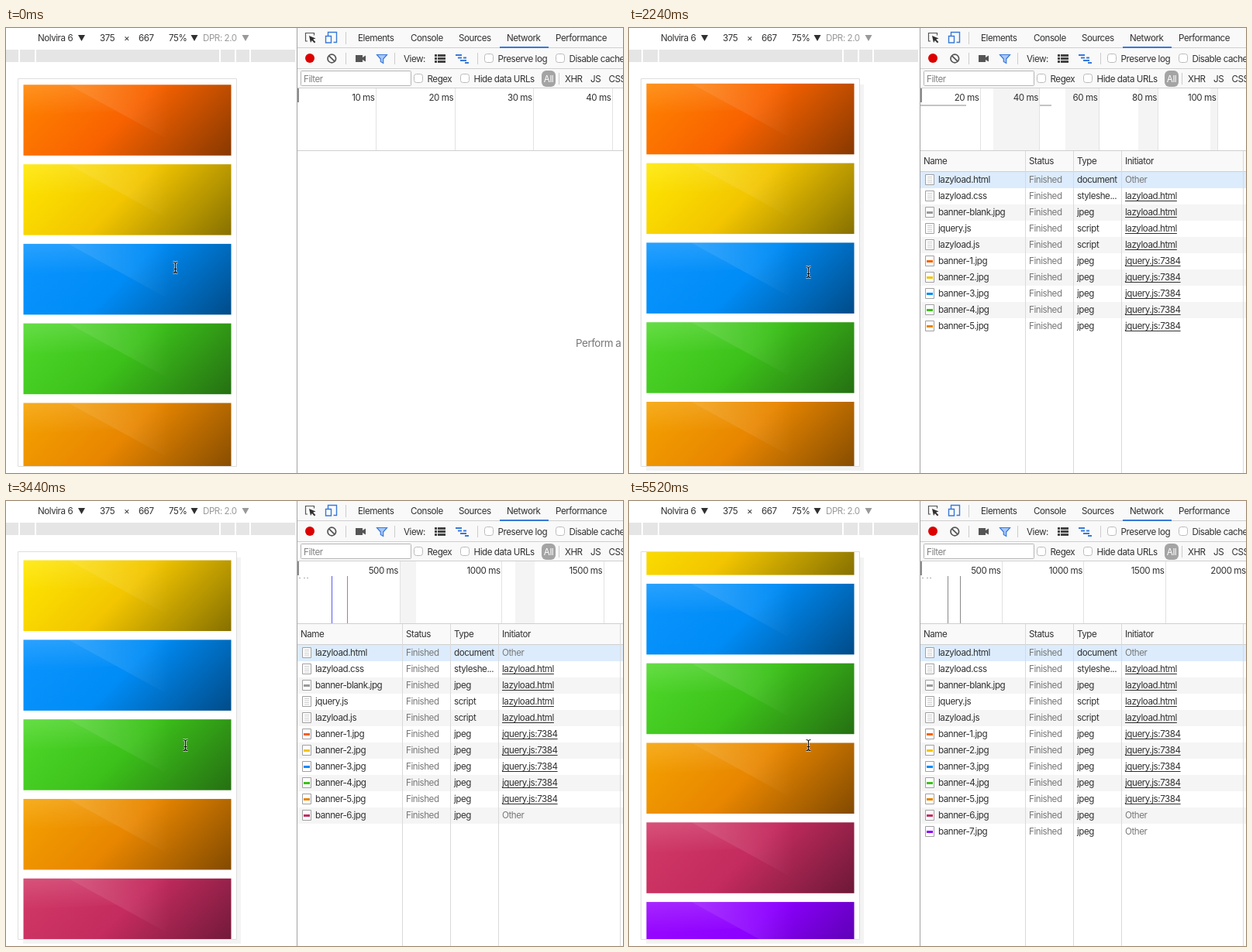
Write an HTML page with a canvas that moves like this. It is 796x575 px and loops after 6.14 s.

```html
<!DOCTYPE html>
<html>
<head>
<meta charset="utf-8">
<style>
  html, body { margin: 0; width: 100%; height: 100%; overflow: hidden; background: #fff; }
  canvas { display: block; }
</style>
</head>
<body>
<canvas id="stage" width="796" height="575"></canvas>
<script>
const ctx = document.getElementById('stage').getContext('2d');
const LOOP = 6140, STEP = 150;
const INK = '#303030', DIM = '#777', BLUE = '#3879d9', BAR = '#f9f9f9';

// light, middle and dark tone of every banner
const BANNERS = [
  ['#ff8400', '#f86200', '#873800'],
  ['#ffe800', '#f2c500', '#867000'],
  ['#0a94ff', '#008cf6', '#004b88'],
  ['#50d92c', '#3cc11a', '#256f12'],
  ['#f5a200', '#e88600', '#824a00'],
  ['#d23a68', '#c42b5e', '#6c1837'],
  ['#9a08ff', '#8c00ff', '#5200a0']
];
const BLANK = ['#b4b4b4', '#a9a9a9', '#828282'];

const FILES = [
  ['lazyload.html', 'document', 'Other'],
  ['lazyload.css', 'styleshe...', 'lazyload.html'],
  ['banner-blank.jpg', 'jpeg', 'lazyload.html', '#999'],
  ['jquery.js', 'script', 'lazyload.html'],
  ['lazyload.js', 'script', 'lazyload.html'],
  ...BANNERS.map((tones, i) =>
    [`banner-${i + 1}.jpg`, 'jpeg', i < 5 ? 'jquery.js:7384' : 'Other', tones[1]])
];

// time, scroll offset, speed in px/ms
const SCROLL = [
  [2090, 0, 0], [2240, 1.5, .02], [2990, 60, .1], [3890, 133, .073], [4480, 170.5, .02], [4780, 172, 0]
];

function scrollAt(t) {
  if (t <= SCROLL[0][0]) return 0;
  const i = SCROLL.findIndex(key => key[0] >= t);
  if (i < 0) return 172;
  const [t0, y0, v0] = SCROLL[i - 1], [t1, y1, v1] = SCROLL[i];
  const d = t1 - t0, u = (t - t0) / d, w = 1 - u;
  return w * w * ((1 + 2 * u) * y0 + u * d * v0) + u * u * ((3 - 2 * u) * y1 - w * d * v1);
}

function rect(x, y, w, h, color) {
  ctx.fillStyle = color;
  ctx.fillRect(x, y, w, h);
}

function path(d, color, width) {
  const p = new Path2D(d);
  if (width) {
    ctx.strokeStyle = color;
    ctx.lineWidth = width;
    ctx.stroke(p);
  } else {
    ctx.fillStyle = color;
    ctx.fill(p);
  }
}

function box(x, y, w, h, r, fill, stroke) {
  ctx.beginPath();
  ctx.roundRect(x, y, w, h, r);
  if (fill) { ctx.fillStyle = fill; ctx.fill(); }
  if (stroke) { ctx.strokeStyle = stroke; ctx.lineWidth = 1; ctx.stroke(); }
}

function text(str, x, y, color = INK, align = 'left', size = 11.6) {
  ctx.font = `${size}px Inter, sans-serif`;
  ctx.letterSpacing = '-0.45px';
  ctx.textAlign = align;
  ctx.fillStyle = color;
  ctx.fillText(str, x, y);
}

function link(str, x, y) {
  text(str, x, y);
  rect(x, y + 2, ctx.measureText(str).width, 1, INK);
}

function checkbox(x, y, label) {
  box(x + .5, y + .5, 11, 11, 3, '#fff', '#bbb');
  text(label, x + 17.5, y + 11);
}

const arrow = (x, color) => path(`M${x} 9h9l-4.5 8z`, color);

function banner(y, [light, mid, dark]) {
  ctx.save();
  ctx.translate(22.5, y);
  let g = ctx.createLinearGradient(0, 0, 180, 180);
  g.addColorStop(0, light);
  g.addColorStop(.48, mid);
  g.addColorStop(1, dark);
  rect(0, 0, 268, 91.5, g);
  g = ctx.createLinearGradient(60, 0, 190, 0);
  g.addColorStop(0, '#ffffff30');
  g.addColorStop(1, '#ffffff00');
  path('M58 0L182 68L230 0z', g);
  g = ctx.createLinearGradient(0, 0, 0, 40);
  g.addColorStop(0, '#ffffff20');
  g.addColorStop(1, '#ffffff00');
  path('M0 0H58L120 34L0 40z', g);
  ctx.restore();
}

function drawPage(t, scroll) {
  if (t >= 140) path('M298 73h5v499H22v-5h276z', '#f3f3f3');
  box(15.5, 65.5, 282, 501, 0, '#fff', '#dedede');
  ctx.save();
  ctx.beginPath();
  ctx.rect(16, 66, 281, 500);
  ctx.clip();
  const loaded = t < 3140 ? 5 : t < 4330 ? 6 : 7;
  BANNERS.forEach((tones, i) => banner(73.3 + 102.8 * i - scroll, i < loaded ? tones : BLANK));
  ctx.restore();
}

function drawDeviceBar() {
  text('Nolvira 6', 41, 17);
  arrow(93, INK);
  text('375', 121, 17);
  text('×', 152, 17);
  text('667', 171, 17);
  text('75%', 210, 17);
  arrow(238.5, INK);
  text('DPR: 2.0', 254, 17, '#999');
  arrow(304.5, '#999');
  rect(0, 28, 373, 16, '#e5e5e5');
  for (const x of [16, 37, 275, 295, 314]) rect(x, 28, 2, 16, '#fff');
}

function drawToolbars() {
  rect(376, 0, 420, 78, BAR);
  rect(375, 0, 1, 575, '#a3a3a3');
  for (const y of [25, 52, 77]) rect(376, y, 420, 1, '#cfcfcf');

  path('M389 17h-2.5v-10.5h11v3', '#555', 1.2);
  path('M391 10l8.5 3.4-3.4 1.3 3.2 3.4-1.4 1.3-3.2-3.4-1.7 3z', INK);
  path('M415.5 10v-4.5h11v13h-4M412.5 10.5h7v8.5h-7z', BLUE, 1.4);
  rect(438, 5, 1, 16, '#ccc');
  [['Elements', 454], ['Console', 522], ['Sources', 584], ['Network', 646], ['Performance', 709]]
    .forEach(([name, x]) => text(name, x, 17));
  rect(637, 24, 63, 2, BLUE);

  path('M386 39a6 6 0 1 0 12 0a6 6 0 1 0-12 0', '#dc0000');
  path('M415 39.5a5.3 5.3 0 1 0 10.6 0a5.3 5.3 0 1 0-10.6 0M416.6 35.8l7.4 7.4', '#555', 1.7);
  rect(438, 32, 1, 15, '#ccc');
  path('M451 35h9v3l4-2.5v8l-4-2.5v3h-9z', '#555');
  path('M478.5 34.5h13l-4.8 5.5v5.5l-3.4-2v-3.5z', '#a8c7f8');
  path('M478.5 34.5h13l-4.8 5.5v5.5l-3.4-2v-3.5z', BLUE, 1.2);
  rect(501, 32, 1, 15, '#ccc');
  text('View:', 513, 44);
  for (const y of [34, 38, 42]) {
    rect(553, y, 3, 3, '#444');
    rect(557, y, 10, 3, '#444');
  }
  path('M580 35h8M583 38.5h5M590 38.5h4M586 42h8M592 45h5', BLUE, 2);
  rect(608, 32, 1, 15, '#ccc');
  checkbox(617, 33, 'Preserve log');
  checkbox(709, 33, 'Disable cache');

  box(380.5, 55.5, 142, 19, 1, '#fff', '#b5b5b5');
  text('Filter', 384, 70, '#808080');
  checkbox(526, 59, 'Regex');
  checkbox(586, 59, 'Hide data URLs');
  box(691, 55, 18, 21, 6, '#a4a4a4');
  text('All', 700, 70, '#fff', 'center');
  rect(713, 58, 1, 15, '#ccc');
  text('XHR', 721, 70);
  text('JS', 754, 70);
  text('CSS', 777.5, 70);
}

function drawTicks(first, pitch, unit) {
  for (let i = 0, x = first; x < 800; x = first + pitch * ++i) {
    rect(Math.floor(x), 78, 1, 80, '#e2e2e2');
    text(`${unit * (i + 1)} ms`, x - 2, 94, INK, 'right');
  }
}

function drawTimeline(t) {
  if (t < 140) {
    drawTicks(477.5, 101.6, 10);
  } else if (t < 3140) {
    for (const [x, w] of [[470, 59], [563, 43], [657, 25], [750, 9]]) rect(x, 78, w, 80, '#f4f4f4');
    drawTicks(453.3, 76.5, 20);
    rect(376, 99, 59, 2, '#c4c4c4');
    rect(530, 99, 15, 2, '#c4c4c4');
  } else if (t < 4480) {
    rect(508, 78, 21, 80, '#f4f4f4');
    rect(657, 78, 25, 80, '#f4f4f4');
    drawTicks(508, 131.6, 500);
    rect(420, 97, 1, 61, '#5a5af0');
    rect(440, 97, 1, 61, '#f06464');
  } else {
    drawTicks(481.5, 105.4, 500);
    rect(411, 97, 1, 61, '#8a8a8a');
    rect(427, 97, 1, 61, '#8a8a8a');
  }
  if (t >= 3140) for (const x of [378, 384, 388]) rect(x, 99, 2, 1, '#aaa');
  rect(376, 78, 2, 18, '#8c8c8c');
  rect(376, 158, 420, 1, '#cfcfcf');
}

function drawFileIcon(y, color) {
  box(382.5, y - 6.5, 11, 13, 0, '#fff', '#a0a0a0');
  if (color) rect(384, y - 1, 8, 3, color);
  else for (let i = 0; i < 4; i++) rect(385, y - 4 + i * 2.5, 6, 1, '#ccc');
}

function drawRequests(t) {
  if (t < 140) {
    text('Perform a', 735, 412, DIM, 'left', 13.4);
    return;
  }
  rect(376, 159, 420, 26, BAR);
  const count = t < 3140 ? 10 : t < 4330 ? 11 : 12;
  FILES.slice(0, count).forEach((file, i) => {
    if (i % 2 === 0) rect(376, 186 + 21 * i, 420, 21, i ? '#f5f5f5' : '#dcecfd');
  });
  rect(376, 185, 420, 1, '#cfcfcf');
  for (const x of [511, 573, 635, 792]) rect(x, 159, 1, 416, '#dadada');
  [['Name', 380], ['Status', 516], ['Type', 578], ['Initiator', 640]]
    .forEach(([name, x]) => text(name, x, 176));
  FILES.slice(0, count).forEach(([name, type, initiator, color], i) => {
    const y = 200 + 21 * i;
    drawFileIcon(y - 4, color);
    text(name, 399, y);
    text('Finished', 516, y, DIM);
    text(type, 578, y);
    if (initiator === 'Other') text(initiator, 640, y, DIM);
    else link(initiator, 640, y);
  });
}

function drawCursor(t) {
  const [x, y] = t < 1040 ? [218.5, 309.5] : t < 1190 ? [227.5, 313.5] : [231.5, 315.5];
  const beam = `M${x - 3} ${y - 7}q3 0 3 2v10q0 2-3 2M${x + 3} ${y - 7}q-3 0-3 2v10q0 2 3 2M${x - 2} ${y + 2}h4`;
  path(beam, '#ffffffb0', 3);
  path(beam, '#111', 1.2);
}

function frame(now) {
  const t = now % LOOP;
  const stepped = 2240 + STEP * Math.floor((t - 2230) / STEP);
  rect(0, 0, 796, 575, '#fff');
  drawDeviceBar();
  drawPage(t, scrollAt(stepped));
  drawToolbars();
  drawTimeline(t);
  drawRequests(t);
  drawCursor(t);
  requestAnimationFrame(frame);
}
const start = performance.now();
requestAnimationFrame(function begin() { frame(0); });
function elapsed() { return performance.now() - start; }
</script>
</body>
</html>
```
